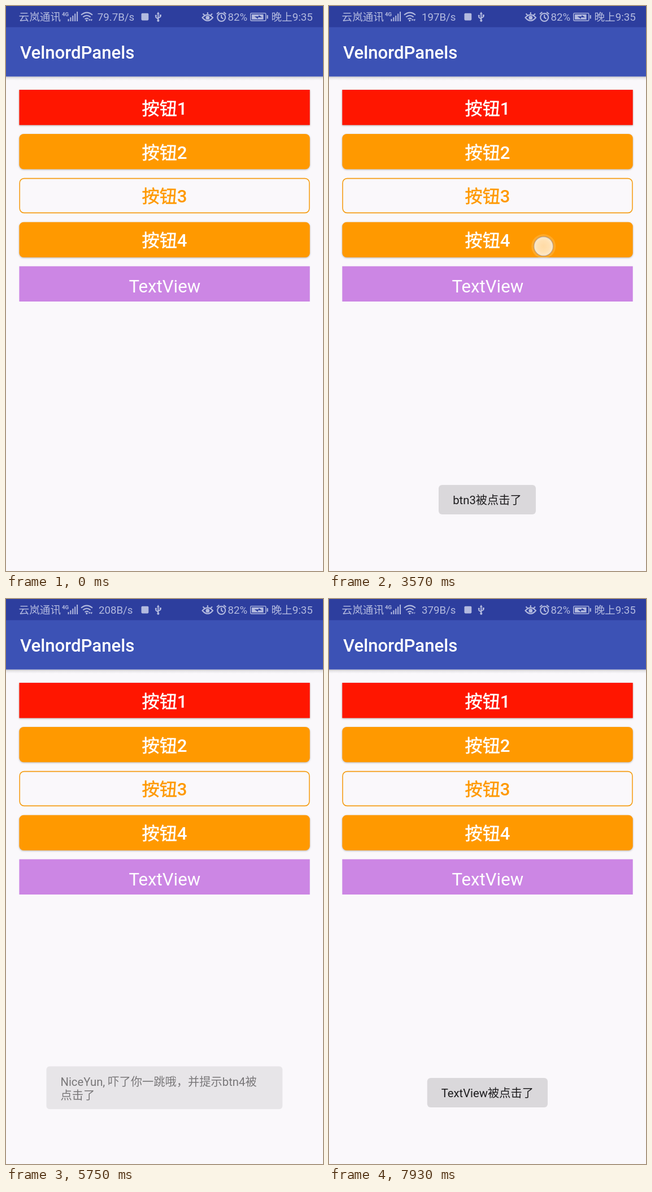
Recreate the animation shown at these times as an HTML page. Size 561x998 px, loop 8 s.

```html
<!DOCTYPE html>
<html lang="zh-CN">
<head>
<meta charset="utf-8">
<title>Buttons and toasts</title>
<style>
  html, body { margin: 0; width: 100%; height: 100%; overflow: hidden; background: #faf8fb; }
  svg { display: block; width: 100%; height: 100%; }
  text { font-family: Roboto, "Noto Sans CJK SC", "Noto Sans CJK", "Noto Sans CJK JP", sans-serif; }

  .status { font-size: 18.7px; fill: #b3badf; }
  .status .line { fill: none; stroke: #b3badf; stroke-width: 2; }
  .title { font-size: 31.2px; font-weight: 500; fill: #fff; }
  .label { font-size: 31.2px; font-weight: 500; fill: #fff; text-anchor: middle; }
  .label tspan { stroke: #fff; stroke-width: .5px; }
  .label.hollow, .label.hollow tspan { fill: #ff9900; }
  .label.hollow tspan { stroke: #ff9900; }
  .label.plain { font-weight: 400; }
  .mid { text-anchor: middle; }
  .raised { filter: drop-shadow(0 1.5px 1.5px rgba(0, 0, 0, .28)); }
  .toast { font-size: 20.25px; fill: #1c1b1d; }
  .toast rect { fill: #dad8db; }

  /* one 8 s loop: 1% = 80 ms */
  .toast, .touch, .lift { opacity: 0; animation: 8s linear infinite; }
  .speed, .arrow, .press { animation: 8s step-end infinite; }

  .speed { visibility: hidden; }
  #speed1 { animation-name: speed1; }
  #speed2 { animation-name: speed2; }
  #speed3 { animation-name: speed3; }
  #speed4 { animation-name: speed4; }
  @keyframes speed1 { 0% { visibility: visible } 16.625%, 100% { visibility: hidden } }
  @keyframes speed2 { 0% { visibility: hidden } 16.625% { visibility: visible } 55.25%, 100% { visibility: hidden } }
  @keyframes speed3 { 0% { visibility: hidden } 55.25% { visibility: visible } 91.625%, 100% { visibility: hidden } }
  @keyframes speed4 { 0% { visibility: hidden } 91.625%, 100% { visibility: visible } }

  .arrow { animation-name: arrow; }
  @keyframes arrow { 0% { opacity: 1 } 87% { opacity: .5 } 93.875% { opacity: 1 } 99.125%, 100% { opacity: .6 } }

  #touch1 { animation-name: touch1; }
  #touch2 { animation-name: touch2; }
  #touch3 { animation-name: touch3; }
  @keyframes touch1 { 0%, 21.24% { opacity: 0 } 21.25%, 23.5% { opacity: 1 } 25%, 100% { opacity: 0 } }
  @keyframes touch2 { 0%, 44.615% { opacity: 0 } 44.625%, 46.875% { opacity: 1 } 48.5%, 100% { opacity: 0 } }
  @keyframes touch3 { 0%, 77.24% { opacity: 0 } 77.25%, 79.75% { opacity: 1 } 81.5%, 100% { opacity: 0 } }

  .press { animation-name: press; }
  .lift { animation-name: lift; }
  @keyframes press { 0% { fill: #ff9900 } 46% { fill: #cc7a00 } 47.5%, 100% { fill: #ff9900 } }
  @keyframes lift { 0%, 46% { opacity: 0 } 47.2%, 47.7% { opacity: 1 } 49%, 100% { opacity: 0 } }

  #toast1 { animation-name: toast1; }
  #toast2 { animation-name: toast2; }
  #toast3 { animation-name: toast3; }
  @keyframes toast1 {
    0%, 24.875% { opacity: 0; transform: translateY(6px) }
    27%, 47.0625% { opacity: 1; transform: none }
    48%, 100% { opacity: 0; transform: translateY(8px) }
  }
  @keyframes toast2 {
    0%, 48.75% { opacity: 0; transform: translateY(6px) }
    50.625%, 71.5% { opacity: 1; transform: none }
    72.4375%, 100% { opacity: 0; transform: translateY(8px) }
  }
  @keyframes toast3 {
    0%, 80.375% { opacity: 0; transform: translateY(6px) }
    82.375%, 100% { opacity: 1; transform: none }
  }
</style>
</head>
<body>
<svg viewBox="0 0 561 998" preserveAspectRatio="none">
  <defs>
    <linearGradient id="barShade" x2="0" y2="1">
      <stop offset="0" stop-color="#000" stop-opacity=".2"/>
      <stop offset=".4" stop-color="#000" stop-opacity=".07"/>
      <stop offset="1" stop-color="#000" stop-opacity="0"/>
    </linearGradient>
    <radialGradient id="core">
      <stop offset="0" stop-color="#fff" stop-opacity=".58"/>
      <stop offset=".6" stop-color="#fff" stop-opacity=".64"/>
      <stop offset="1" stop-color="#fff" stop-opacity=".76"/>
    </radialGradient>
    <filter id="soft" x="-5%" y="-30%" width="110%" height="160%">
      <feGaussianBlur stdDeviation="3.5"/>
    </filter>
    <g id="dot">
      <circle r="21.5" fill="#fff" fill-opacity=".16"/>
      <circle r="17" fill="url(#core)" stroke="#77738c" stroke-opacity=".38" stroke-width="1.8"/>
    </g>
  </defs>

  <rect width="561" height="998" fill="#faf8fb"/>
  <rect y="124.6" width="561" height="7" fill="url(#barShade)"/>
  <rect y="37" width="561" height="87.6" fill="#3c52b5"/>
  <rect width="561" height="37.4" fill="#2d3e9e"/>

  <g class="status">
    <text x="22.5" y="26">云岚通讯</text>
    <text x="99" y="17.5" font-size="9.5" font-weight="700">4G</text>
    <path class="line" stroke-width="2.4" d="M110.5 27v-4M114.4 27v-7M118.3 27v-10M122.2 27v-13.5M126.1 27v-17"/>
    <path class="line" d="M133 15.8Q143 7.5 153 15.8M136.3 19.6Q143 14 149.7 19.6M139.6 23.2Q143 20.4 146 22.8"/>
    <circle cx="142.8" cy="25.6" r="1.6"/>
    <path d="M145.6 25.6l2-3 2 3z"/>
    <path class="arrow" d="M149.2 23.6h4l-2 3.2z"/>
    <g class="mid">
      <text class="speed" id="speed1" x="194.5" y="26">79.7B/s</text>
      <text class="speed" id="speed2" x="194.2" y="26">197B/s</text>
      <text class="speed" id="speed3" x="194.2" y="26">208B/s</text>
      <text class="speed" id="speed4" x="194.2" y="26">379B/s</text>
    </g>
    <rect x="239.5" y="12.8" width="12.8" height="12.6" rx="1.8"/>
    <path class="line" stroke-width="1.5" d="M269.3 13v12M265.3 17.5v2.5l4 3M273.3 17v2l-4 2.5"/>
    <path d="M266.8 14.2l2.5-4 2.5 4z"/>
    <circle cx="269.3" cy="25.8" r="2.1"/>
    <circle cx="265.3" cy="17" r="1.6"/>
    <rect x="271.8" y="15.2" width="3" height="3"/>
    <path class="line" d="M347.5 20.5Q356.8 10.5 366 20.5Q356.8 31.5 347.5 20.5zM348.5 13.5l3 3M356.8 11v3.5M365 13.5l-3 3"/>
    <circle cx="356.8" cy="20.7" r="3.4"/>
    <circle class="line" cx="381.2" cy="20" r="7"/>
    <path class="line" d="M373 14.2l4.2-3.4M389.4 14.2l-4.2-3.4M381.2 15.6v4.8l3.2 2"/>
    <text x="392.4" y="26">82%</text>
    <rect class="line" x="432.8" y="12.6" width="27" height="13.4" rx="1.6" style="stroke-width:1.4"/>
    <rect x="435" y="14.8" width="20.5" height="9"/>
    <rect x="461.6" y="16" width="2.2" height="6.6" rx=".8"/>
    <path d="M439.5 18.2l7.5 .3 .3-2.6 6.2 4.4-7.4-.2-.2 2.6z" fill="#2d3e9e"/>
    <text x="469.4" y="26">晚上9:35</text>
  </g>
  <text class="title" x="24.9" y="93">VelnordPanels</text>

  <rect class="raised" x="23.4" y="148" width="514.3" height="62.3" fill="#ff1600"/>
  <rect class="raised" x="23.4" y="225.9" width="514.3" height="62.3" rx="7.8" fill="#ff9900"/>
  <rect x="24.2" y="304.6" width="512.7" height="60.8" rx="7.8" fill="none" stroke="#f59d14" stroke-width="1.56"/>
  <rect class="lift" x="23.4" y="386.5" width="514.3" height="62.3" rx="7.8" fill="#000" fill-opacity=".3" filter="url(#soft)"/>
  <g class="raised">
    <rect class="press" x="23.4" y="381.8" width="514.3" height="62.3" rx="7.8" fill="#ff9900"/>
  </g>
  <rect x="23.4" y="459.7" width="514.3" height="62.3" fill="#cc86e4"/>

  <text class="label" x="280.5" y="191.6"><tspan>按钮</tspan>1</text>
  <text class="label" x="280.5" y="269.5"><tspan>按钮</tspan>2</text>
  <text class="label hollow" x="280.5" y="347.4"><tspan>按钮</tspan>3</text>
  <text class="label" x="280.5" y="425.3"><tspan>按钮</tspan>4</text>
  <text class="label plain" x="280.8" y="506">TextView</text>

  <g class="toast mid" id="toast1">
    <rect x="194" y="846" width="172" height="52" rx="6"/>
    <text x="280" y="880.3">btn3被点击了</text>
  </g>
  <g class="toast" id="toast2">
    <rect x="71.5" y="822" width="417.8" height="76" rx="6"/>
    <text x="96.5" y="856.3">NiceYun, 吓了你一跳哦，并提示btn4被</text>
    <text x="96.5" y="880.3">点击了</text>
  </g>
  <g class="toast mid" id="toast3">
    <rect x="173.8" y="846" width="213.2" height="52" rx="6"/>
    <text x="280.3" y="880.3">TextView被点击了</text>
  </g>

  <g class="touch" id="touch1"><use href="#dot" x="380" y="345"/></g>
  <g class="touch" id="touch2"><use href="#dot" x="379.7" y="424.5"/></g>
  <g class="touch" id="touch3"><use href="#dot" x="381" y="488"/></g>
</svg>
</body>
</html>
```
